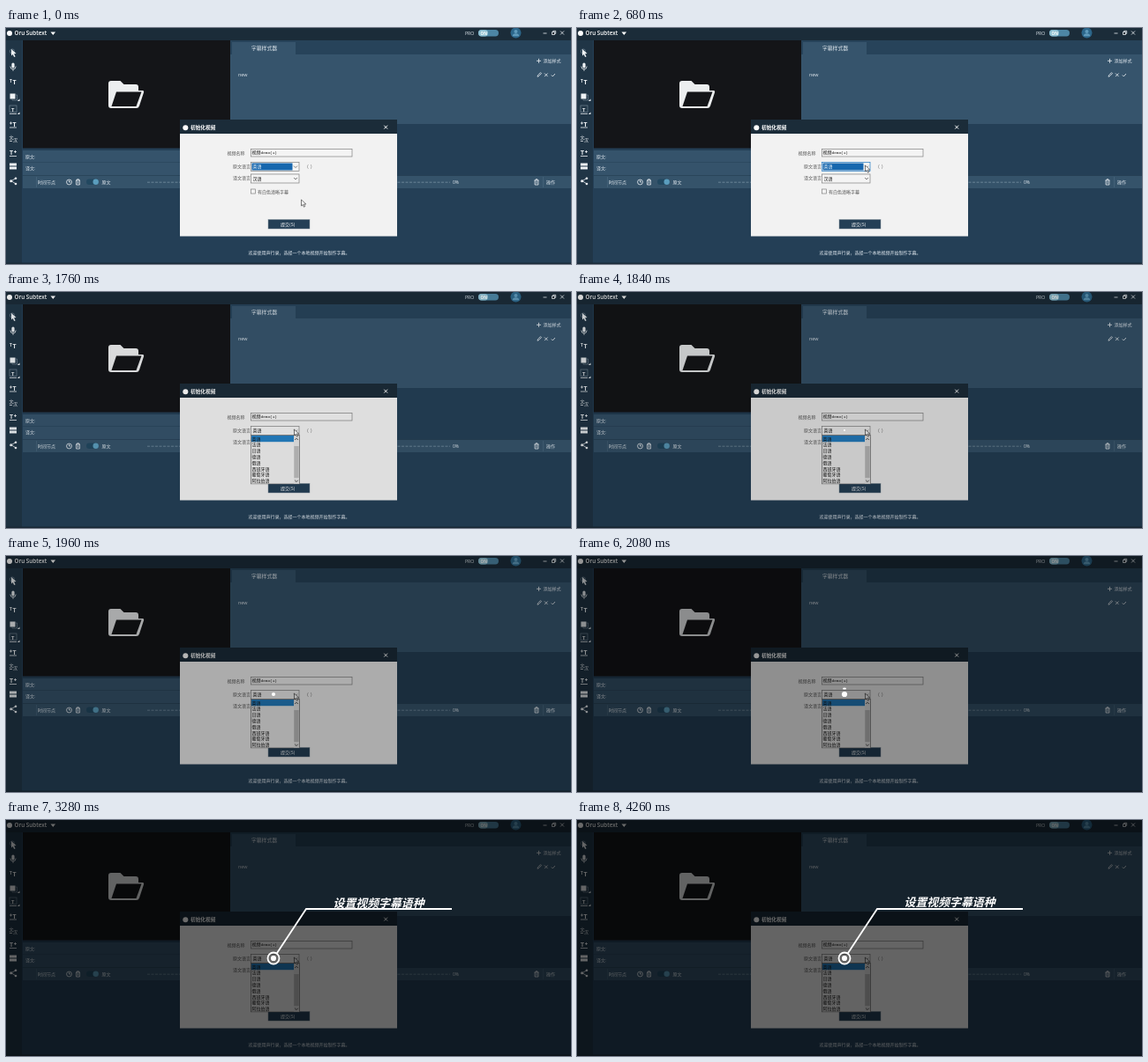
These frames come from a looping animation (640x268 px, 4740 ms). An HTML page:

```html
<!DOCTYPE html>
<html lang="en">
<head>
<meta charset="utf-8">
<title>Subtitle language setup</title>
<style>
html, body { margin: 0; width: 100%; height: 100%; overflow: hidden; background: #243f56; }
svg { display: block; width: 640px; height: 268px; }
text { font: 5px "Noto Sans CJK SC", "Noto Sans CJK", sans-serif; fill: #e3eaf0; white-space: pre; }
.dark text { fill: #555; }
.dark .ink { fill: #151515; }
.dark .lit { fill: #fff; }
.ico { fill: none; stroke: #eef2f5; stroke-width: .8; }
.ico .f { fill: #eef2f5; stroke: none; }
.ico .dim { stroke: #7d909f; stroke-width: .6; }
.ico text { fill: #eef2f5; stroke: none; font: 600 7px "Noto Sans", sans-serif; }
.call { fill: none; stroke: #fff; stroke-width: 1.8; }
.call text { font-size: 12.9px; font-weight: 700; font-style: italic; fill: #fff; stroke: none; }
</style>
</head>
<body>
<svg viewBox="0 0 640 268">
  <defs>
    <clipPath id="listClip"><rect id="listBox" x="277" y="162" width="57" height="0"/></clipPath>
    <clipPath id="titleClip"><rect x="350" y="78" width="150" height="22"/></clipPath>
  </defs>

  <!-- panels -->
  <rect width="640" height="268" fill="#243f56"/>
  <rect x="19" y="139" width="235" height="29" fill="#35536b"/>
  <path d="M19 152.5H254" stroke="#2a465c" stroke-width=".7"/>
  <rect x="19" y="168" width="621" height="14" fill="#35536a"/>
  <path d="M19 167.5H640" stroke="#263f54" stroke-width=".7"/>
  <rect x="254" y="14" width="386" height="16" fill="#27435a"/>
  <rect x="254" y="30" width="386" height="79" fill="#36546c"/>
  <rect x="256" y="16" width="72" height="14" fill="#36546c"/>
  <rect x="19" y="14" width="235" height="122.5" fill="#141518"/>
  <rect y="14" width="18" height="254" fill="#203546"/>
  <rect width="640" height="14" fill="#1b2c39"/>
  <rect y="266.5" width="640" height="1.5" fill="#1b2c39"/>

  <!-- title bar -->
  <circle cx="4" cy="6" r="3" fill="#fff"/>
  <text x="9.5" y="8.2" style="font:600 6.3px 'Open Sans',sans-serif;fill:#fff">Oru Subtext</text>
  <path d="M50.5 4.5h5.6l-2.8 3.4z" fill="#fff"/>
  <text x="520" y="7.6" style="font:5.2px 'Open Sans',sans-serif">PRO</text>
  <rect x="535" y="2" width="23" height="7.4" rx="3.7" fill="#4d86a5"/>
  <rect x="535" y="2" width="11" height="7.4" rx="3.7" fill="#8fc0d2"/>
  <text x="537.5" y="7.6" style="font:700 4.6px 'Open Sans',sans-serif;fill:#fff">ON</text>
  <circle cx="577.5" cy="5.6" r="6" fill="#2c668a"/>
  <circle cx="577.5" cy="4" r="2" fill="#5f9abb"/>
  <path d="M573.8 9.2q0-3 3.7-3t3.7 3z" fill="#5f9abb"/>
  <path class="ico" d="M608.5 6h4M618.5 4.5h3v3h-3zM619.700 4.500v-1.200h3v3h-1.200M628 3.500l4 4m0-4l-4 4"/>

  <!-- tool strip -->
  <g class="ico">
    <circle class="dim" cx="7" cy="26.5" r="2.6"/>
    <path class="f" d="M6 24l5.600 5-2.500.3 1.500 3.200-1.400.6-1.500-3.200L6 31.500z"/>
    <rect class="f" x="6.4" y="39.5" width="3.2" height="6" rx="1.6"/>
    <path d="M4.900 43.500q0 3.400 3.100 3.400t3.100-3.400M8 47v1.800"/>
    <text x="4" y="61.500" style="font-size:5px">T</text><text x="7.500" y="64">T</text>
    <path class="f" d="M4.500 74.500h6v6h-6z"/><path class="dim" d="M10.500 76h2v6H7v-1.500"/>
    <rect class="dim" x="4" y="88" width="8" height="7.500"/><text x="6" y="94.500" style="font-size:6px">T</text><path d="M4 97.400h8"/>
    <text x="7.500" y="111.500">T</text><path d="M4 108h3M5.500 106.500v3M4 113h8"/>
    <text x="3.500" y="126" style="font:5px 'Noto Sans CJK SC',sans-serif">文</text><text x="8" y="129" style="font:5px 'Noto Sans CJK SC',sans-serif">汉</text><path d="M4 128.400h3"/>
    <text x="4" y="143.500">T</text><path d="M9 140.500h3M10.500 139v3M4 145.500h8"/>
    <path class="f" d="M4 153.500h8v3H4zM4 157.600h8v3H4z"/>
    <path d="M11 170.700l-5 3 5 3.200"/>
    <circle class="f" cx="11" cy="170.700" r="1.300"/><circle class="f" cx="5.700" cy="173.700" r="1.500"/><circle class="f" cx="11" cy="177" r="1.300"/>
    <path class="f" d="M15.500 80.500v2.600h-2.600zM15.500 95.500v2.600h-2.600z"/>
  </g>

  <!-- preview folder -->
  <path d="M116 63q0-3 3-3h10.500l4 4H147q3 0 3 3v4h4.500q2.200 0 1.500 2.300L151 88.500q-.8 2.500-3.500 2.500H119q-3 0-3-3z" fill="#eceeef"/>
  <path d="M125 72.500h28.500l-6 16.500h-28z" fill="#141518"/>

  <!-- style panel -->
  <text x="278" y="25.400" style="font-size:5.800px;font-weight:500">字幕样式器</text>
  <text x="608.500" y="39.200">添加样式</text>
  <path class="ico" d="M601 37.300h5M603.500 34.800v5"/>
  <text x="263" y="55.300" style="font:5.400px 'Open Sans',sans-serif">new</text>
  <path class="ico" d="M602 55.300l.5-1.700 3-3 1 1-3 3zM610 51.500l3.600 3.600m0-3.600l-3.600 3.600M617.800 53.500l1.500 1.500 2.600-3"/>

  <!-- captions and timeline -->
  <text x="22" y="148">原文:</text>
  <text x="22" y="161.300">译文:</text>
  <text x="36" y="176.800">时间节点</text>
  <g class="ico">
    <circle cx="71.500" cy="175" r="2.900"/><path d="M71.500 173v2h1.600"/>
    <path id="bin" d="M79 173h5M80.500 173v-1.200h2V173M79.600 173v5h3.800v-5M81.500 174.200v2.500"/>
    <use href="#bin" x="519.500"/>
  </g>
  <rect x="91" y="171.500" width="14" height="6.600" rx="3.300" fill="#224860"/>
  <circle cx="101.700" cy="174.800" r="3.200" fill="#5b9dbd"/>
  <text x="108.500" y="176.800">原文</text>
  <path d="M160 175.200H503" stroke="#7f98a9" stroke-width=".7" stroke-dasharray="3 1.500"/>
  <text x="506" y="176.900" style="font:5px 'Open Sans',sans-serif">0%</text>
  <path d="M34.500 169v12M608.500 169v12" stroke="#4c6a80" stroke-width=".6"/>
  <text x="612" y="176.800">操作</text>
  <text x="274.500" y="256.800">欢迎使用声行录，选择一个本地视频开始制作字幕。</text>

  <!-- dialog -->
  <g class="dark">
    <rect x="197" y="104" width="246" height="16" fill="#1b2c39"/>
    <rect x="197" y="120" width="246" height="116.500" fill="#f2f2f2"/>
    <circle cx="203.300" cy="113.300" r="3" fill="#fff"/>
    <text class="lit" x="209" y="115.300" style="font-size:5.700px;font-weight:700">初始化视频</text>
    <path d="M428.300 110.700l3.800 3.800m0-3.800l-3.800 3.800" stroke="#fff"/>
    <text x="250.500" y="143.800">视频名称</text>
    <text x="257" y="159">原文语言</text>
    <text x="257" y="172.200">译文语言</text>
    <g fill="#f4f4f4" stroke="#808080" stroke-width=".7">
      <rect x="277.500" y="137.500" width="114.500" height="8.500"/>
      <rect id="combo" x="277.500" y="152.500" width="54.500" height="10"/>
      <rect x="277.500" y="166" width="54.500" height="10"/>
      <rect x="277.500" y="183" width="5" height="5"/>
    </g>
    <text class="ink" x="278.500" y="143.300">视频<tspan style="font:4.400px 'Liberation Mono',monospace">demo(1)</tspan></text>
    <rect id="picked" x="278.500" y="153.500" width="46" height="8" fill="#1767ae"/>
    <text id="value" class="lit" x="279.500" y="159.300">英语</text>
    <text class="ink" x="279.500" y="172.600">汉语</text>
    <path d="M326 156.600l2 2 2-2M326 170l2 2 2-2" fill="none" stroke="#666" stroke-width=".8"/>
    <text x="341" y="158.800">(  )</text>
    <text x="285" y="187.600">有白色清晰字幕</text>
    <rect x="297" y="217.500" width="47" height="10.500" fill="#243f56" stroke="#7d8b96" stroke-width=".5"/>
    <text class="lit" x="311" y="224.700">提交(S)</text>

    <g clip-path="url(#listClip)">
      <rect x="277.500" y="162.500" width="55" height="55.500" fill="#f0f0f0" stroke="#777" stroke-width=".8"/>
      <rect x="278" y="163" width="48" height="7.200" fill="#2580c4"/>
      <g id="items"></g>
      <rect x="326" y="163" width="6" height="54.600" fill="#e6e6e6"/>
      <rect x="326.300" y="175" width="5.400" height="36" fill="#bcbcbc"/>
      <path d="M327.200 168l1.800-1.800 1.800 1.800M327.200 213.800l1.800 1.800 1.800-1.800" fill="none" stroke="#444" stroke-width=".9"/>
    </g>
  </g>

  <path id="cursor" d="M0 0v7l1.700-1.500 1.200 2.700 1.300-.6-1.200-2.600h2.300z" fill="#fff" stroke="#222" stroke-width=".6"/>
  <rect id="shade" width="640" height="268" opacity="0"/>

  <!-- callout -->
  <g class="call">
    <circle id="dot" cx="303" cy="157" r="0" fill="#fff" stroke="none"/>
    <path id="ringL" pathLength="100" d="M303 150.500a6.500 6.500 0 0 0 0 13"/>
    <path id="ringR" pathLength="100" d="M303 150.500a6.500 6.500 0 0 1 0 13"/>
    <path id="leader" pathLength="100" d="M306.700 151.500L340 101H505"/>
    <g clip-path="url(#titleClip)"><text id="title" x="370.500" y="97.900">设置视频字幕语种</text></g>
  </g>
</svg>
<script>
const LOOP = 4740;
const el = id => document.getElementById(id);
const set = (id, attrs) => {
  for (const k in attrs) el(id).setAttribute(k, attrs[k]);
};

el('items').innerHTML = ['英语', '法语', '日语', '德语', '俄语', '西班牙语', '葡萄牙语', '阿拉伯语']
  .map((s, i) => `<text class="ink" x="278.5" y="${168.6 + i * 6.8}">${s}</text>`)
  .join('');

const span = (t, a, b) => Math.min(1, Math.max(0, (t - a) / (b - a)));
const inOut = p => p < .5 ? 4 * p ** 3 : 1 - (2 - 2 * p) ** 3 / 2;
const out = p => 1 - (1 - p) ** 3;

function stroke(id, p) {
  set(id, { 'stroke-dasharray': `${p * 100} 200`, visibility: p > 0 ? 'visible' : 'hidden' });
}

function draw(t) {
  const move = inOut(span(t, 0, 560));
  set('cursor', { transform: `translate(${334.5 - 8 * move} ${195 - 39 * move})` });

  const open = span(t, 1320, 1460);
  set('combo', { stroke: t > 560 && !open ? '#1f78c4' : '#808080' });
  set('picked', { visibility: open ? 'hidden' : 'visible' });
  set('value', { class: open ? 'ink' : 'lit' });
  set('listBox', { height: 56.5 * open });

  set('shade', { opacity: .585 * span(t, 1680, 2250) });
  set('dot', { r: 3.1 * span(t, 1720, 2080) });
  const ring = span(t, 2020, 2680);
  stroke('ringL', ring);
  stroke('ringR', ring);
  stroke('leader', inOut(span(t, 2200, 2960)));

  const rise = span(t, 2800, 3640);
  set('title', {
    transform: `translate(0 ${18 * (1 - out(rise))})`,
    visibility: rise ? 'visible' : 'hidden'
  });
}

const start = performance.now();
function tick() {
  draw((performance.now() - start) % LOOP);
  requestAnimationFrame(tick);
}
tick();
</script>
</body>
</html>
```
